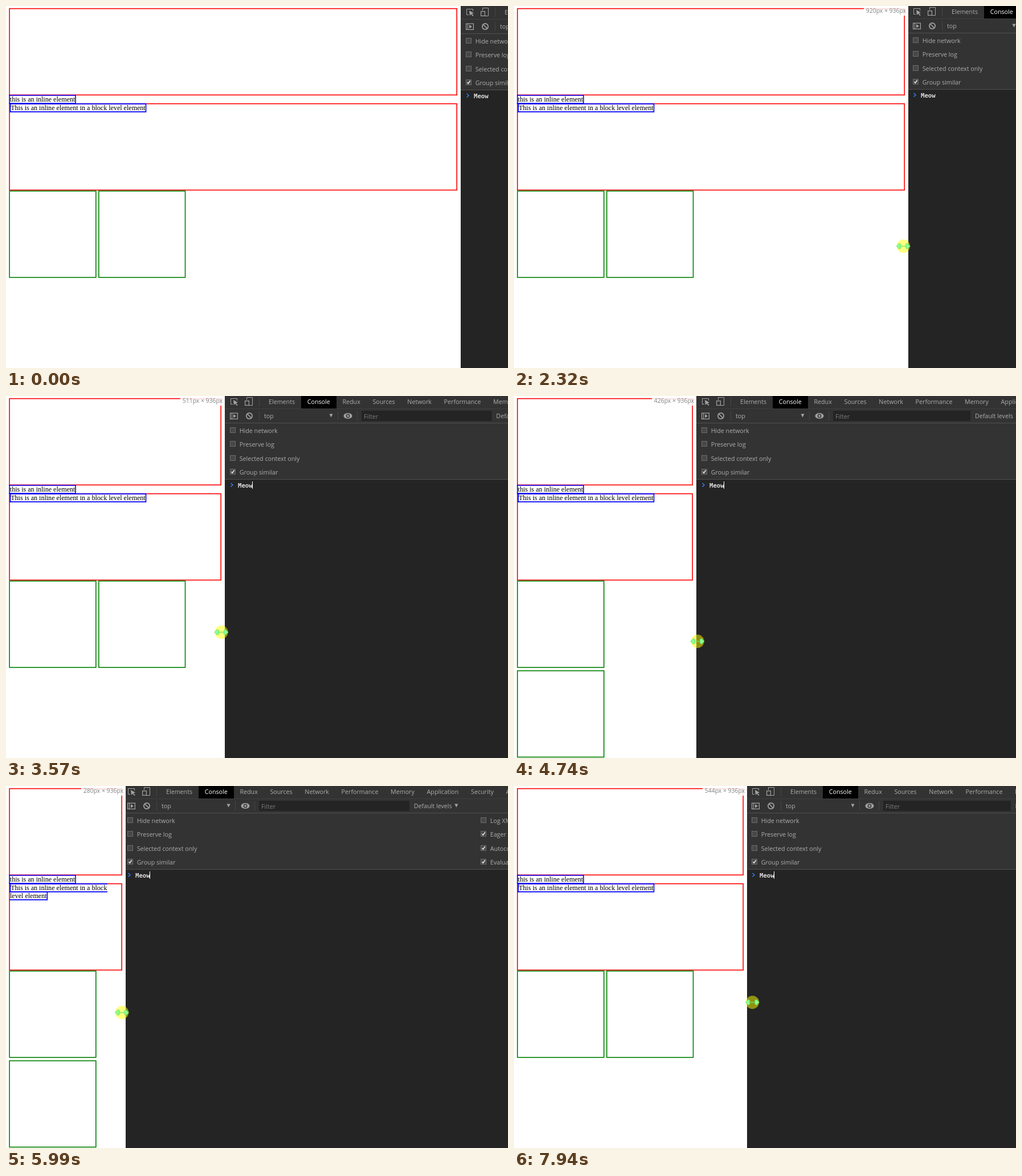
Animation, 881 px wide and 636 px high, one loop 8000 ms. Source, as an HTML page with a canvas:

```html
<!DOCTYPE html>
<html lang="en">
<head>
<meta charset="utf-8">
<title>Block and inline elements beside a console</title>
<style>
  html, body { margin: 0; height: 100%; overflow: hidden; background: #fff; }
  canvas { display: block; }
</style>
</head>
<body>
<canvas id="stage" width="881" height="636"></canvas>
<script>
const ctx = document.getElementById('stage').getContext('2d');
const LOOP = 8000, STEP = 78.1, DRAG = 1610, SCALE = .7515, BORDER = 1.6;
const GRAY = '#adadad', ICON = '#a3a3a3';
const UI = '10.7px "Open Sans", sans-serif';
const SERIF = '12.05px "Liberation Serif", serif';
const MONO = 'bold 10.7px "DejaVu Sans Mono", monospace';

const tabs = ['Elements', 'Console', 'Redux', 'Sources', 'Network', 'Performance', 'Memory',
  'Application', 'Security', 'Audits'];
const options = [
  ['Hide network', 'Log XMLHttpRequests'],
  ['Preserve log', 'Eager evaluation'],
  ['Selected context only', 'Autocomplete from history'],
  ['Group similar', 'Evaluate triggers user activation']
];

// Progress from 0 to 1 between two times, slow at both ends.
function ease(t, start, end) {
  const p = Math.min(1, Math.max(0, (t - start) / (end - start)));
  return (1 - Math.cos(Math.PI * p)) / 2;
}

const panelAt = t => 798 - 478 * ease(t, 1445, 4231) - 120 * ease(t, 5112, 6104)
  - 18 * ease(t, 6160, 6500) + 285.5 * ease(t, 6500, 8557);

const cursorHeight = t => 422 - 7 * ease(t, 2400, 3500) + 16 * ease(t, 4150, 4700)
  - 33 * ease(t, 4900, 5950) - 19 * ease(t, 5950, 8300);

function fill(x, y, w, h, color) {
  ctx.fillStyle = color;
  ctx.fillRect(x, y, w, h);
}

function text(str, x, y, color, font = UI) {
  ctx.font = font;
  ctx.fillStyle = color;
  ctx.fillText(str, x, y);
}

// A border drawn inside the given outer edges.
function border(left, top, right, bottom, color, width = BORDER) {
  ctx.strokeStyle = color;
  ctx.lineWidth = width;
  ctx.strokeRect(left + width / 2, top + width / 2, right - left - width, bottom - top - width);
}

function line(points, color, width = 1) {
  ctx.strokeStyle = color;
  ctx.lineWidth = width;
  ctx.beginPath();
  points.forEach(p => ctx.lineTo(...p));
  ctx.stroke();
}

function shape(points, color) {
  ctx.fillStyle = color;
  ctx.beginPath();
  points.forEach(p => ctx.lineTo(...p));
  ctx.fill();
}

function disc(x, y, rx, color, ry = rx) {
  ctx.fillStyle = color;
  ctx.beginPath();
  ctx.ellipse(x, y, rx, ry, 0, 0, 2 * Math.PI);
  ctx.fill();
}

const downArrow = (x, y) => shape([[x - 3, y - 3], [x + 3, y - 3], [x, y + 3]], ICON);

function checkbox(x, y, checked) {
  fill(x - 5, y - 5, 10, 10, '#474747');
  border(x - 5, y - 5, x + 5, y + 5, '#6c6c6c', 1);
  if (checked) line([[x - 2.5, y], [x - .8, y + 2.2], [x + 2.7, y - 2.8]], '#ddd', 1.7);
}

function drawIcons() {
  line([[14, 14.5], [10.5, 14.5], [10.5, 4.5], [21.5, 4.5], [21.5, 8]], ICON);
  shape([[15, 7], [23, 11.5], [18.5, 13], [16, 16]], ICON);
  line([[18, 12], [22, 16.5]], ICON, 1.8);

  line([[38.5, 7], [38.5, 2.5], [48.5, 2.5], [48.5, 16.5], [43, 16.5]], ICON);
  border(35, 8, 43, 17, ICON, 1.2);

  border(9, 29.5, 23, 41, ICON, 1.2);
  line([[12.5, 30], [12.5, 40.5]], ICON);
  shape([[15, 32], [20, 35.3], [15, 38.5]], ICON);

  disc(43, 35, 6, ICON);
  disc(43, 35, 4.3, '#333');
  line([[39.5, 31.5], [46.5, 38.5]], ICON, 1.7);

  disc(216, 35, 7.5, ICON, 5);
  disc(216, 35, 3.4, '#333');
  disc(216, 35, 1.9, ICON);
}

function drawTabs() {
  let x = 77;
  fill(134, -1, 62, 23, '#000');
  for (const name of tabs) {
    text(name, x, 13.5, name === 'Console' ? '#fff' : GRAY);
    x += ctx.measureText(name).width + 21.7;
  }
}

function drawPanel(left, t) {
  ctx.save();
  ctx.translate(left, t < DRAG ? 1 : 0);
  fill(0, -1, 881, 148, '#333');
  fill(0, 22, 881, 1, '#3f3f3f');
  fill(0, 47, 881, 1, '#505050');
  fill(0, 146, 881, 1, '#505050');
  fill(-1, -1, 1, 638, '#505050');
  fill(60, 2, 1, 16, '#454545');
  for (const x of [60, 198, 232]) fill(x, 27, 1, 16, '#454545');
  drawIcons();
  drawTabs();

  text('top', 69, 39, GRAY);
  downArrow(186.5, 34.5);
  const filterEnd = 544 - .197 * left;
  fill(240, 26, filterEnd - 240, 18, '#242424');
  text('Filter', 244, 39.5, '#7c7c7c');
  text('Default levels', filterEnd + 8, 39, GRAY);
  downArrow(filterEnd + 82.5, 34.5);

  const column = Math.round(736 - left / 2);
  options.forEach(([first, second], row) => {
    const y = Math.round(60 + row * 24.4);
    checkbox(14, y, row === 3);
    text(first, 25.7, y + 4.5, GRAY);
    checkbox(column, y, row > 0);
    text(second, column + 11.7, y + 4.5, GRAY);
  });

  line([[10.5, 153], [14, 156.2], [10.5, 159.5]], '#367cf1', 1.5);
  text('Meow', 23, 160.5, '#e0e0e0', MONO);
  const blink = Math.floor((t - 1385) / 530);
  if (blink >= 0 && blink % 2 === 0) fill(48, 150, 1, 13, '#fff');
  ctx.restore();
}

// Splits a sentence into lines that end before the limit.
function wrap(sentence, limit) {
  const lines = [''];
  ctx.font = SERIF;
  for (const word of sentence.split(' ')) {
    const last = lines.length - 1;
    const longer = (lines[last] + ' ' + word).trim();
    if (8 + ctx.measureText(longer).width > limit) lines.push(word);
    else lines[last] = longer;
  }
  return lines;
}

// An inline element: its border stays open where the text breaks.
function inline(sentence, left, top, limit) {
  const lines = wrap(sentence, limit);
  lines.forEach((words, i) => {
    const x = i ? 7 : left + 1.5, y = top + 14 * i + .8;
    const start = i ? 6 : left, end = x + ctx.measureText(words).width + .8;
    text(words, x, y + 11, '#000', SERIF);
    for (const edge of [y, y + 14]) line([[start, edge], [end, edge]], '#00f', BORDER);
    const sides = [];
    if (i === 0) sides.push(left + .8);
    if (i === lines.length - 1) sides.push(end);
    for (const side of sides) line([[side, y - .8], [side, y + 14.8]], '#00f', BORDER);
  });
}

function drawPage(exactWidth, t) {
  const width = Math.round(exactWidth), size = 204 * SCALE;
  const square = (x, y) => border(x, y, x + size, y + size, '#008000');
  fill(0, 0, width, 636, '#fff');
  for (const top of [3.8, 170.9]) border(5.3, top, width - 6, top + size, '#f00');
  inline('this is an inline element', 5.3, 156.2, width - 8);
  inline('This is an inline element in a block level element', 6.7, 171.1, width - 8);

  square(5.3, 324.3);
  if (width > 321) square(162, 324.3);
  else square(5.3, 481.9);

  if (t >= DRAG) {
    fill(width - 78, 0, 78, 17, 'rgba(255,255,255,.85)');
    ctx.textAlign = 'right';
    text(Math.round(exactWidth / SCALE) + 'px × 936px', width - 4, 11.7, '#808080', '10.4px "Open Sans", sans-serif');
    ctx.textAlign = 'left';
  }
}

function drawPointer(t) {
  ctx.translate(781 + 27 * ease(t, 100, 500), 571 - 145 * ease(t, 100, 900));
  const arrow = [[0, 0], [0, 16], [4, 12.5], [6.5, 18], [9, 17], [6.5, 11.5], [11.5, 11.5], [0, 0]];
  shape(arrow, '#fff');
  line(arrow, '#000');
}

function drawResizer(t) {
  // The hand runs slightly ahead of the panel edge it drags.
  ctx.translate(panelAt(t + 45) + 2, cursorHeight(t));
  if (t > 1380) disc(0, 0, 11.7, 'rgba(255,255,0,.5)');
  line([[-6, 0], [6, 0]], '#6be86b', 1.3);
  for (const side of [-1, 1]) {
    const head = [[12, 0], [7, -5], [4.5, -3.5], [4.5, 3.5], [7, 5], [12, 0]].map(([x, y]) => [x * side, y]);
    shape(head, '#8dff8d');
    line(head, '#58d858', .8);
  }
}

function frame(now) {
  const time = now % LOOP;
  const t = time < 130 ? 0 : 130 + Math.floor((time - 120) / STEP) * STEP;
  const left = panelAt(t);
  // Once its text wraps, the page follows the panel with a delay.
  const pageWidth = left < 254 ? panelAt(t - 72) : left;

  fill(0, 0, 881, 636, '#242424');
  drawPanel(Math.floor(left), t);
  drawPage(pageWidth, t);
  ctx.save();
  if (t >= 1050) drawResizer(t);
  else if (t >= 130) drawPointer(t);
  ctx.restore();
  requestAnimationFrame(frame);
}
requestAnimationFrame(frame);
</script>
</body>
</html>
```
